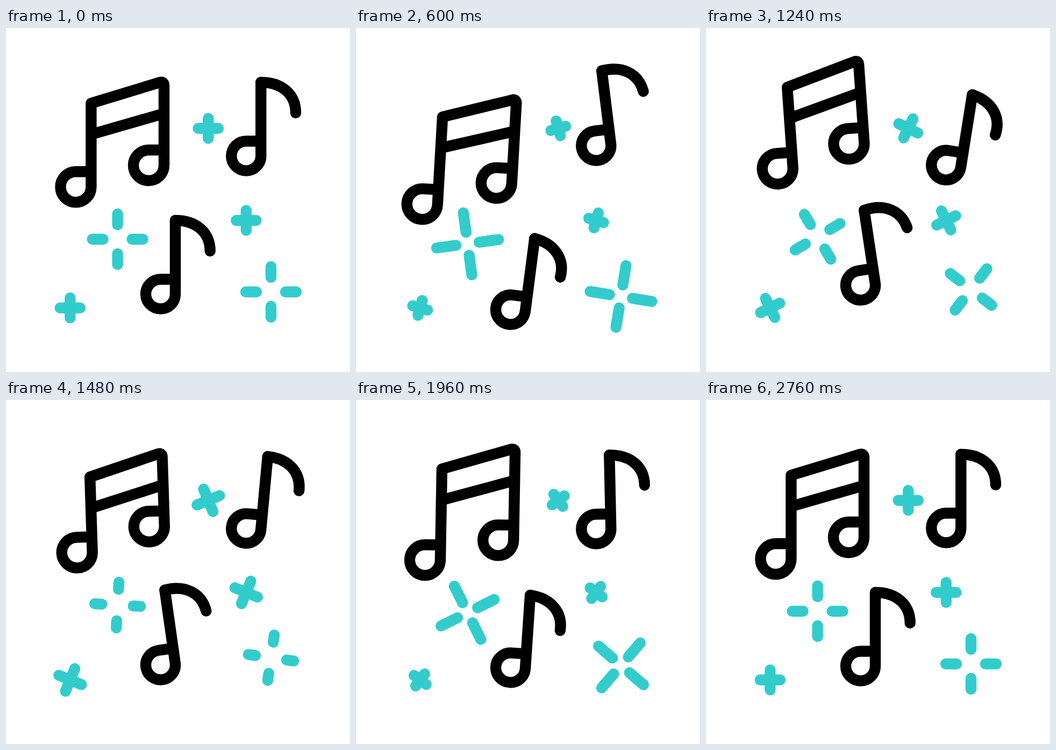
Write an HTML page that moves like this. It is 640 px wide and 640 px high and loops after 3040 ms.

```html
<!DOCTYPE html>
<html lang="en">
<head>
<meta charset="utf-8">
<title>Music notes</title>
<style>
html, body { margin: 0; width: 100%; height: 100%; overflow: hidden; background: #fff; }
svg { display: block; width: 100vw; height: 100vh; }
path { fill: none; stroke-width: 20.4; stroke-linecap: round; stroke-linejoin: round; }
#ink path { stroke: #000; }
#glow path { stroke: #33cccc; }
</style>
</head>
<body>
<svg viewBox="0 0 640 640">
  <g id="ink"></g>
  <g id="glow"></g>
</svg>
<script>
const LOOP = 3040, STEP = 20, START = 220, END = 2760;
const ink = document.getElementById('ink');
const glow = document.getElementById('glow');

function add(parent, tag, d) {
  const el = document.createElementNS('http://www.w3.org/2000/svg', tag);
  if (d) el.setAttribute('d', d);
  return parent.appendChild(el);
}
const move = (el, value) => el.setAttribute('transform', value);
const ease = u => (1 - Math.cos(Math.PI * u)) / 2;

// Swings from rest through evenly spaced peaks and back to rest.
function swing(first, peaks, gap = 490) {
  const values = [0, ...peaks, 0];
  const time = i => i === 0 ? START : Math.min(END, first + (i - 1) * gap);
  return t => {
    if (t <= START || t >= time(values.length - 1)) return 0;
    let i = 0;
    while (t > time(i + 1)) i++;
    const u = (t - time(i)) / (time(i + 1) - time(i));
    return values[i] + (values[i + 1] - values[i]) * ease(u);
  };
}
const pulse = (...peaks) => swing(820, peaks, 660);

// One full turn whose speed wavers as a short sine series (degrees).
function spin(dir, ...waves) {
  return t => {
    const s = Math.min(1, Math.max(0, (t - START) / (END - START)));
    const waver = waves.reduce((sum, k, n) => sum + k * Math.sin((n + 1) * Math.PI * s), 0);
    return dir * (360 * s + waver);
  };
}

// Single note: the head sets the position, the flag turns about the stem top.
function note(x, y, bob, tilt, flap) {
  const g = add(ink, 'g');
  add(g, 'path', 'M27.3-137V0A27.5 27.5 0 1 1 0-27.5H27.3');
  const flag = add(g, 'path', 'M27.3-137C66-137 92-115 92-80');
  return t => {
    move(g, `translate(${x} ${y + bob(t)}) rotate(${tilt(t)})`);
    move(flag, `rotate(${flap(t)} 27.3 -137)`);
  };
}

// Beamed pair: beams and heads slide separately, so the stems stretch.
function pair(beam, left, right, tilt) {
  const el = add(ink, 'path');
  const head = (x, y) => `V${y}A28.5 28.5 0 1 1 ${x - 28.7} ${y - 28.5}H${x}`;
  return t => {
    const b = beam(t);
    el.setAttribute('d',
      `M158.4 ${140 + b}${head(158.4, 295.7 + left(t))}` +
      `M158.4 ${140 + b}L287.3 ${100.8 + b}Q294 ${100 + b} 294 ${107 + b}` +
      head(294, 255.5 + right(t)) +
      `M158.4 ${198 + b}L294 ${159 + b}`);
    move(el, `rotate(${tilt(t)} 197 212)`);
  };
}

const drop = pulse(12, -11.5, 5.8);
const inner = pulse(-7.6, 2.3, -7.8);
const outer = pulse(15.8, -4.4, 10.8);
function spark(x, y, turn) {
  const el = add(glow, 'path');
  return t => {
    const a = 27 + inner(t), b = 47 + outer(t);
    el.setAttribute('d', `M0 ${-b}V${-a}M0 ${a}V${b}M${-b} 0H${-a}M${a} 0H${b}`);
    move(el, `translate(${x} ${y + drop(t)}) rotate(${turn(t)})`);
  };
}

const grow = pulse(-6.1, 4.1, -6.4);
function plus(x, y, dir) {
  const el = add(glow, 'path');
  const turn = spin(dir, -18.5, 12, 2, 17.5);
  return t => {
    const a = 18.6 + grow(t);
    el.setAttribute('d', `M0 ${-a}V${a}M${-a} 0H${a}`);
    move(el, `translate(${x} ${y}) rotate(${turn(t)})`);
  };
}

const parts = [
  pair(
    swing(705, [30.9, -35, 16, -19.8], 470),
    swing(756, [44.6, -38.5, 14.5, -11.5]),
    swing(783, [38.2, -36, 12, -10.5]),
    swing(795, [4.4, -4.2, 2.7, -2.7])),
  note(447, 238,
    swing(700, [-21.2, 17.8, -8.3, 8.5]),
    swing(804, [-9.7, 9.6, -4, 5.6]),
    swing(751, [-9.8, 9.9, -9, 12])),
  note(287.7, 495,
    swing(751, [35.7, -16.3, 13.4, -9.8]),
    swing(855, [11.3, -11, 5.6, -6.1]),
    swing(824, [11, -12, 9.7, -12.9])),
  spark(207.6, 393, spin(1, 6, 17.6, 1.2, 10.8)),
  spark(493, 491, spin(-1, -5, 22.4, 1.8, 9.8)),
  plus(376.3, 186.7, 1),
  plus(446.8, 358, -1),
  plus(119.3, 520.8, -1)
];

function draw(ms) {
  const t = Math.floor((ms % LOOP) / STEP) * STEP;
  parts.forEach(part => part(t));
}
draw(0);
let begin;
requestAnimationFrame(function tick(now) {
  if (begin === undefined) begin = now;
  draw(now - begin);
  requestAnimationFrame(tick);
});
</script>
</body>
</html>
```
